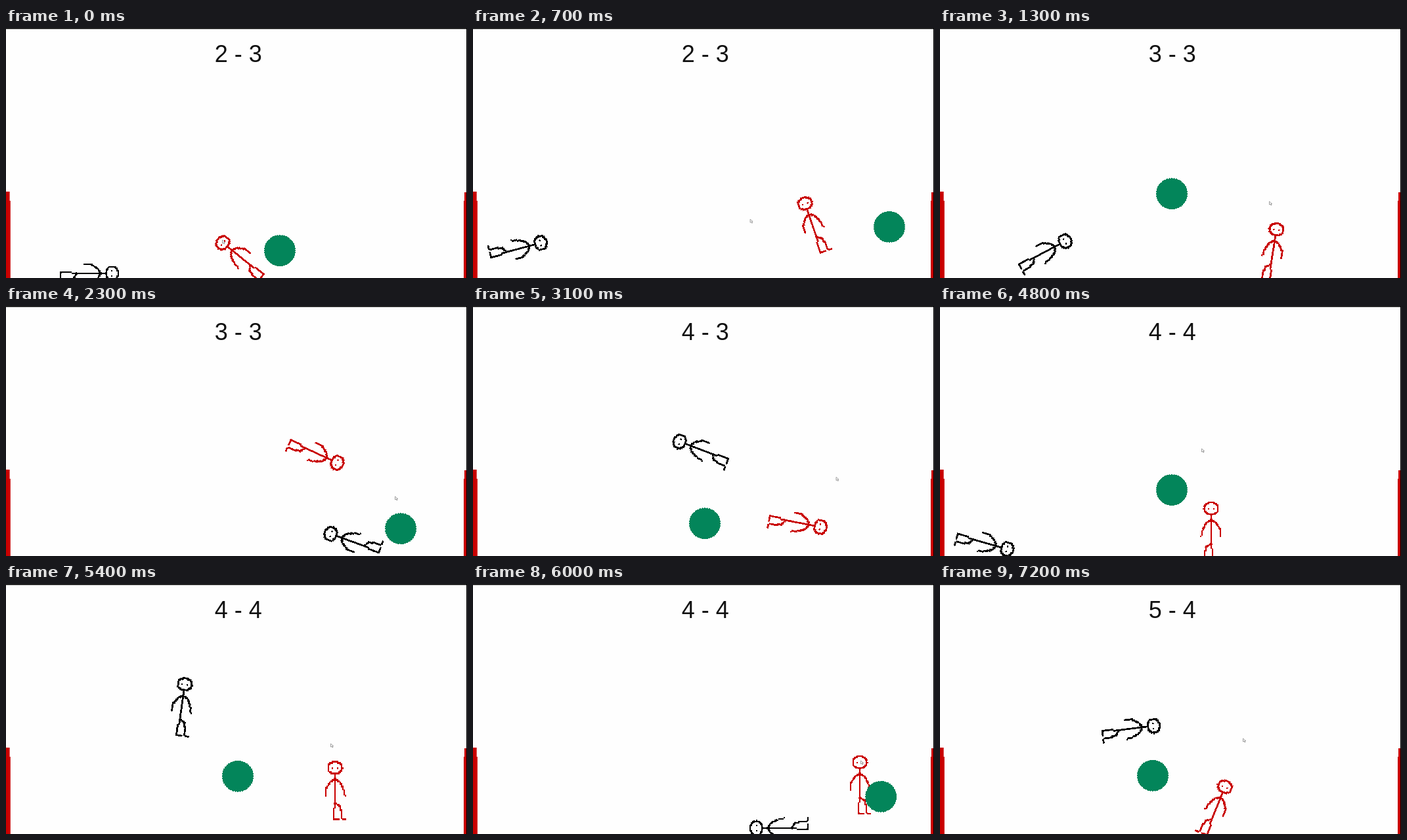
Animation of 702 by 382 pixels, one loop 7300 ms. Source, as an HTML page with a canvas:

```html
<!DOCTYPE html>
<html lang="en">
<head>
<meta charset="utf-8">
<title>Stick football</title>
<style>
  html, body { margin: 0; width: 100%; height: 100%; overflow: hidden; background: #fefefe; }
  #stage { position: relative; width: 702px; height: 382px; overflow: hidden; }
  #stage > * { position: absolute; left: 0; top: 0; }
</style>
</head>
<body>
<div id="stage">
  <canvas id="field" width="702" height="382"></canvas>
  <svg width="702" height="382" viewBox="0 0 702 382">
    <path d="M0 250H5.6V264H6.8V382H0ZM698 251H702V382H697V264H698Z" fill="#c90000"/>
    <path d="M0 0H702V382H701V1.5H0Z" fill="#000"/>
    <text id="score" x="353.8" y="52" text-anchor="middle" font-size="36" fill="#111"
      font-family="'Liberation Sans', Arial, sans-serif"></text>
    <path id="cursor" d="M-1.5 -3V2L0 1L1 3L2 2.5L1 .5H2.5Z" fill="#fff" stroke="#8a8a8a" stroke-width=".8"/>
  </svg>
</div>
<script>
const LOOP = 7300, STEP = 100;
const GRAVITY = 790, BOUNCE = 0.62, FLOOR = 358, DROP_Y = 190;

// Each leg runs from one beat to the next.
const beats = [0, 1300, 2300, 3900, 4800, 6000, 7200];

// Per beat: x, y, tilt; then sideways swing and jump height of the leg that follows.
const black = [
  [127, 375, 90, -95, 20], [160, 342, 62, 0, 30], [527, 360, -70, 0, 60], [167, 199, -68, -50, 0],
  [69, 362, 106, 0, 180], [466, 373, -90, -148, 20], [291, 221, 83]
];
const red = [
  [357, 350, -51, 100, 45], [507, 342, 9, -95, 80], [473, 225, 115, 140, -90], [319, 257, 87, 50, 0],
  [413, 344, 0, 0, 10], [589, 307, 0, 200, -20], [421, 342, 22]
];
const pointer = [[331, 327], [503, 268], [594, 294], [515, 235], [400, 221], [592, 273], [463, 239]];

// The ball drops, bounces, is kicked once and ends in a goal.
const rounds = [
  { score: "2 - 3", drop: -1400, x: 417, kick: 0, vx: 310, vy: -328 },
  { score: "3 - 3", drop: 900, x: 353, kick: 2000, vx: 827, vy: 35 },
  { score: "4 - 3", drop: 2500, x: 353, kick: 3520, vx: -663, vy: -8 },
  { score: "4 - 4", drop: 4320, x: 353, kick: 5400, vx: 447, vy: -185 },
  { score: "5 - 4", drop: 6190, x: 353, kick: 7100, vx: -290, vy: -130 }
];

const ctx = document.getElementById("field").getContext("2d", { willReadFrequently: true });
const score = document.getElementById("score");
const cursor = document.getElementById("cursor");

function pose(path, t) {
  let i = 0;
  while (i < beats.length - 2 && beats[i + 1] < t) i++;
  const [x, y, tilt = 0, swing = 0, jump = 0] = path[i], [x2, y2, tilt2 = 0] = path[i + 1];
  const u = Math.min(1, (t - beats[i]) / (beats[i + 1] - beats[i]));
  return {
    x: x + (x2 - x) * u + swing * Math.sin(Math.PI * u * u),
    y: y + (y2 - y) * u - jump * 4 * u * (1 - u),
    tilt: tilt + (tilt2 - tilt) * u,
    speed: x2 - x + swing * 2 * Math.PI * u * Math.cos(Math.PI * u * u)
  };
}

function bounceY(s) {
  const fall = Math.sqrt(2 * (FLOOR - DROP_Y) / GRAVITY);
  if (s < fall) return DROP_Y + GRAVITY / 2 * s * s;
  s -= fall;
  let v = GRAVITY * fall * BOUNCE;
  while (v > 20 && s > 2 * v / GRAVITY) {
    s -= 2 * v / GRAVITY;
    v *= BOUNCE;
  }
  return Math.min(FLOOR, FLOOR - v * s + GRAVITY / 2 * s * s);
}

function ballAt(r, t) {
  const y = bounceY((Math.min(t, r.kick) - r.drop) / 1000);
  const s = Math.max(0, t - r.kick) / 1000;
  return {
    x: Math.max(26, Math.min(692, r.x + r.vx * s)),
    y: Math.min(FLOOR, y + r.vy * s + GRAVITY / 2 * s * s)
  };
}

// Figures are sprites of 2px blocks, turned as a whole.
function dot(x, y) {
  ctx.fillRect(Math.round(x / 2) * 2 - 1.15, Math.round(y / 2) * 2 - 1.15, 2.3, 2.3);
}

function line(...pts) {
  for (let i = 0; i + 3 < pts.length; i += 2) {
    const [x, y, x2, y2] = pts.slice(i, i + 4);
    const n = Math.ceil(Math.hypot(x2 - x, y2 - y));
    for (let k = 0; k <= n; k++) dot(x + (x2 - x) * k / n, y + (y2 - y) * k / n);
  }
}

function drawFigure(path, t, color) {
  const p = pose(path, t);
  const turned = pose(path, (t + LOOP - STEP) % LOOP).speed < 0;
  ctx.save();
  ctx.translate(p.x, p.y);
  ctx.rotate(p.tilt * Math.PI / 180);
  ctx.scale(turned ? -1 : 1, 1);
  ctx.fillStyle = color;
  for (let a = 0; a < Math.PI * 2; a += 0.08) dot(11 * Math.cos(a), -34.5 + 9 * Math.sin(a));
  dot(-4, -35);
  dot(4, -35);
  line(0, -25, 0, 19);
  line(-15, 7, -13, -4, -8, -12, 0, -18, 8, -12, 12, -4, 15, 7);
  line(0, 19, -3, 43, 5, 43);
  line(0, 19, 8, 24, 11, 43, 16, 43);
  ctx.restore();
}

function drawBall({ x, y }) {
  const teeth = 40;
  ctx.fillStyle = "#03855a";
  ctx.beginPath();
  for (let i = 0; i < teeth * 2; i++) {
    const a = i * Math.PI / teeth, r = i % 2 ? 23.2 : 24.4;
    ctx.lineTo(x + r * Math.cos(a), y + r * Math.sin(a));
  }
  ctx.fill();
}

// Hard pixel edges instead of antialiasing.
function harden() {
  const img = ctx.getImageData(0, 0, 702, 382), d = img.data;
  for (let i = 3; i < d.length; i += 4) d[i] = d[i] > 120 ? 255 : 0;
  ctx.putImageData(img, 0, 0);
}

function render(t) {
  const round = rounds.filter(r => r.drop <= t).pop();
  ctx.clearRect(0, 0, 702, 382);
  drawFigure(black, t, "#000");
  drawFigure(red, t, "#c90000");
  drawBall(ballAt(round, t));
  harden();
  score.textContent = round.score;
  const c = pose(pointer, t);
  cursor.setAttribute("transform", `translate(${c.x} ${c.y})`);
}

const start = performance.now();
let shown = -1;
function tick() {
  const t = Math.floor((performance.now() - start) % LOOP / STEP) * STEP;
  if (t !== shown) render(shown = t);
  requestAnimationFrame(tick);
}
tick();
</script>
</body>
</html>
```
